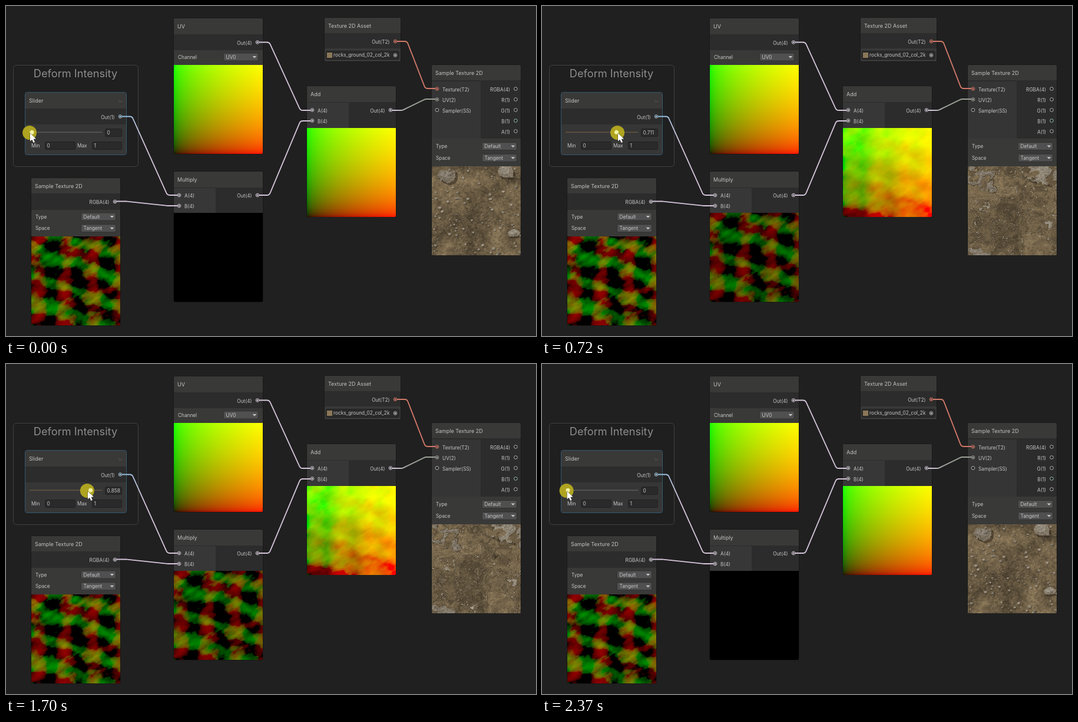
Animation, 900 px wide and 560 px high, one loop 2.42 s. Source, as an HTML page with a canvas:

```html
<!DOCTYPE html>
<html lang="en">
<head>
<meta charset="utf-8">
<title>Deform Intensity</title>
<style>
html, body { margin: 0; width: 100%; height: 100%; overflow: hidden; background: #202020; }
canvas { display: block; }
</style>
</head>
<body>
<canvas id="stage" width="900" height="560"></canvas>
<script>
const ctx = document.getElementById('stage').getContext('2d');
const LOOP = 2420, STEP = LOOP / 47, SIZE = 151;
const LILAC = '#d5c5da', SALMON = '#d3796a', LABEL = '#c6c6c6';

function makeCanvas(w, h) {
  const c = document.createElement('canvas');
  c.width = w;
  c.height = h;
  return c.getContext('2d', { willReadFrequently: true });
}
const clamp = (v, lo, hi) => Math.max(lo, Math.min(hi, v));

// --- noise -------------------------------------------------------------
let seed = 11;
function random() {
  seed = (Math.imul(seed, 1664525) + 1013904223) >>> 0;
  return seed / 4294967296;
}
function hash(x, y) {
  let h = Math.imul(x, 374761393) + Math.imul(y, 668265263);
  h = Math.imul(h ^ (h >>> 13), 1274126177);
  return ((h ^ (h >>> 16)) >>> 0) / 4294967296;
}
function noise(x, y) {
  const ix = Math.floor(x), iy = Math.floor(y);
  let u = x - ix, v = y - iy;
  u *= u * (3 - 2 * u);
  v *= v * (3 - 2 * v);
  const top = hash(ix, iy) * (1 - u) + hash(ix + 1, iy) * u;
  const bottom = hash(ix, iy + 1) * (1 - u) + hash(ix + 1, iy + 1) * u;
  return top * (1 - v) + bottom * v;
}
function fbm(x, y, octaves) {
  let sum = 0, amp = 0.5;
  for (let i = 0; i < octaves; i++, amp /= 2) {
    sum += amp * (noise(x, y) - 0.5);
    x = x * 2.03 + 17;
    y = y * 2.03 + 31;
  }
  return sum;
}

// --- signed deformation field: warped bands broken up by brush streaks ---
function makeField(band, shift) {
  const field = new Float32Array(SIZE * SIZE);
  for (let y = 0; y < SIZE; y++) for (let x = 0; x < SIZE; x++) {
    const wx = x + 30 * fbm(x / 26 + shift, y / 26, 4);
    const wy = y + 30 * fbm(x / 26, y / 26 + shift + 9, 4);
    const streak = fbm((x - 0.6 * y) / 34 + shift, (0.6 * x + y) / 13, 5);
    field[y * SIZE + x] = clamp(0.05 + 0.13 * Math.cos(2 * Math.PI * band(wx, wy)) + 0.5 * streak, -0.2, 0.32);
  }
  return field;
}
const red = makeField(x => (x - 57) / 48, 3);
const green = makeField((x, y) => (y - 22 - 0.38 * x) / 44, 57);

// --- ground texture -----------------------------------------------------
const TEX = 302;
function drawRock(g, x, y, r) {
  const points = Array.from({ length: 8 }, (_, i) => {
    const a = i * Math.PI / 4, d = r * (0.7 + 0.45 * random());
    return [Math.cos(a) * d, Math.sin(a) * d * 0.8];
  });
  const shape = (dx, dy, k, color) => {
    g.fillStyle = color;
    g.beginPath();
    points.forEach(([px, py]) => g.lineTo(x + dx + px * k, y + dy + py * k));
    g.fill();
  };
  const tone = 125 + 40 * random();
  shape(r * 0.15 + 1, r * 0.2 + 1, 1.05, 'rgba(40,33,24,.5)');
  shape(0, 0, 1, `rgba(${tone},${tone * 0.93},${tone * 0.82},.8)`);
  shape(-r * 0.12, -r * 0.15, 0.62, `rgba(${tone + 20},${tone + 13},${tone},.5)`);
}
function makeGround() {
  const g = makeCanvas(TEX, TEX);
  for (const [x, y, r] of [[54, 34, 34], [252, 18, 32], [280, 226, 22]]) drawRock(g, x, y, r);
  for (let i = 0; i < 280; i++) {
    const x = random() * TEX, y = random() * TEX;
    drawRock(g, x, y, 1.6 + 5 * random() ** 4);
  }
  const image = g.getImageData(0, 0, TEX, TEX), d = image.data;
  for (let i = 0; i < TEX * TEX; i++) {
    const x = i % TEX, y = Math.floor(i / TEX);
    const light = 1 + 0.8 * fbm(x / 45, y / 45, 4) + 0.6 * fbm(x / 6, y / 6, 3);
    const a = d[i * 4 + 3] / 255, grain = 1 + 0.55 * fbm(x / 4, y / 4, 2);
    [108, 93, 69].forEach((base, c) => {
      d[i * 4 + c] = base * light * (1 - a) + d[i * 4 + c] * grain * a;
    });
  }
  return d;
}
const ground = makeGround();

// --- previews -----------------------------------------------------------
const gamma = v => 255 * Math.pow(clamp(v, 0, 1), 1 / 2.2);
const panel = makeCanvas(SIZE, SIZE);
const pixels = panel.createImageData(SIZE, SIZE);
function paintPreview(target, left, top, shade) {
  for (let i = 0; i < SIZE * SIZE; i++) {
    const u = (i % SIZE + 0.5) / SIZE, v = 1 - (Math.floor(i / SIZE) + 0.5) / SIZE;
    const [r, g, b] = shade(i, u, v);
    pixels.data.set([r, g, b, 255], i * 4);
  }
  panel.putImageData(pixels, 0, 0);
  target.save();
  target.beginPath();
  target.roundRect(left, top, SIZE, SIZE, [0, 0, 2, 2]);
  target.clip();
  target.drawImage(panel.canvas, left, top);
  target.restore();
}
const scaled = k => i => [gamma(red[i] * k), gamma(green[i] * k), 0];
const offset = k => (i, u, v) => [gamma(u + red[i] * k), gamma(v + green[i] * k), 0];
const wrap = v => Math.floor((v - Math.floor(v)) * TEX) % TEX;
const deformed = k => (i, u, v) => {
  const p = 4 * (wrap(1 - v - green[i] * k) * TEX + wrap(u + red[i] * k));
  return [ground[p], ground[p + 1], ground[p + 2]];
};

// --- interface pieces ---------------------------------------------------
function box(g, x, y, w, h, fill, radius = 0, stroke) {
  g.beginPath();
  g.roundRect(x, y, w, h, radius);
  if (fill) { g.fillStyle = fill; g.fill(); }
  if (stroke) { g.strokeStyle = stroke; g.lineWidth = 1; g.stroke(); }
}
function disc(g, x, y, r, fill) {
  g.beginPath();
  g.arc(x, y, r, 0, 7);
  g.fillStyle = fill;
  g.fill();
}
function text(g, str, x, y, { size = 8.25, color = LABEL, align = 'left' } = {}) {
  g.font = `${size}px Inter, sans-serif`;
  g.textAlign = align;
  g.fillStyle = color;
  g.fillText(str, x, y + size * 0.37);
}
function node(g, name, x, y, w, h, headH = 27) {
  box(g, x - 0.5, y - 0.5, w + 1, h + 1, '#2c2c2c', 3, '#191919');
  box(g, x, y, w, headH, '#393938', [2, 2, 0, 0]);
  text(g, name, x + 6, y + headH / 2 + 0.5, { size: 9, color: '#c2c2c2' });
}
function port(g, x, y, color = '#cfc8d2', linked = true) {
  disc(g, x, y, 2.8, '#202020');
  g.strokeStyle = color;
  g.lineWidth = 1;
  g.stroke();
  if (linked) disc(g, x, y, 1.5, color);
}
function output(g, label, x, y, color, linked) {
  text(g, label, x - 9.5, y + 1, { align: 'right' });
  port(g, x, y, color, linked);
}
function input(g, label, x, y, color, linked) {
  text(g, label, x + 9, y + 1);
  port(g, x, y, color, linked);
}
function dropdown(g, label, value, x, y, fieldX) {
  text(g, label, x, y);
  box(g, fieldX, y - 6.5, 59, 13, '#505050', 2, '#303030');
  text(g, value, fieldX + 4, y);
  g.fillStyle = '#c4c4c4';
  g.beginPath();
  g.moveTo(fieldX + 49, y - 1.5);
  g.lineTo(fieldX + 56, y - 1.5);
  g.lineTo(fieldX + 52.5, y + 2);
  g.fill();
}
function field(g, x, y, w, value) {
  box(g, x + 0.5, y + 0.5, w - 1, 13, '#2a2a2a', 2, '#212121');
  text(g, value, x + 3.5, y + 7);
}
function wire(g, x1, y1, x2, y2, from = LILAC, to = from) {
  const paint = g.createLinearGradient(x1, 0, x2, 0);
  paint.addColorStop(0.1, from);
  paint.addColorStop(0.4, to);
  g.strokeStyle = paint;
  g.lineWidth = 1.8;
  g.beginPath();
  g.moveTo(x1 + 3, y1);
  g.arcTo(x1 + 20, y1, x2 - 20, y2, 6);
  g.arcTo(x2 - 20, y2, x2, y2, 6);
  g.lineTo(x2 - 3, y2);
  g.stroke();
}

function makeBackdrop() {
  const g = makeCanvas(900, 560);
  box(g, 0, 0, 900, 560, '#202020');
  box(g, 12.5, 100.5, 212, 172, '#1f1f1f', 5, '#414141');
  text(g, 'Deform Intensity', 118, 114, { size: 18.2, color: '#8c8c8c', align: 'center' });

  node(g, 'Slider', 33, 147, 171, 105);
  box(g, 33, 201, 171, 51, '#363636', [0, 0, 2, 2]);
  box(g, 32.5, 146.5, 172, 106, null, 3, '#35596f');
  g.strokeStyle = '#606060';
  g.beginPath();
  g.moveTo(191, 160.5);
  g.lineTo(194, 163.5);
  g.lineTo(197, 160.5);
  g.stroke();
  text(g, 'Min', 43, 237);
  field(g, 66, 230, 52, '0');
  text(g, 'Max', 121, 237);
  field(g, 146, 230, 51, '1');

  node(g, 'UV', 285, 21, SIZE, 230);
  box(g, 285, 75, SIZE, 26, '#393938');
  dropdown(g, 'Channel', 'UV0', 292, 86.5, 369.5);

  node(g, 'Texture 2D Asset', 541, 20, 129, 74, 26);
  box(g, 541, 72, 129, 22, '#393938', [0, 0, 2, 2]);
  box(g, 543.5, 76.5, 124, 14, '#292929', 2, '#222222');
  box(g, 545, 79, 9, 9, '#8b7758');
  text(g, 'rocks_ground_02_col_2k', 556, 83);
  port(g, 661, 83.5, '#b8b8b8');

  for (const [name, x, y] of [['Add', 511, 136], ['Multiply', 285, 281]]) {
    node(g, name, x, y, SIZE, 221);
    box(g, x, y + 28, 71, 43, '#373737');
  }
  node(g, 'Sample Texture 2D', 43, 292, SIZE, 250, 26);
  box(g, 43, 346, SIZE, 45, '#393938');
  node(g, 'Sample Texture 2D', 723, 100, SIZE, 322, 26);
  box(g, 723, 128, 83, 97, '#353535');
  box(g, 723, 225, SIZE, 47, '#393938');
  for (const [x, y, fieldX] of [[50, 357.5, 127.5], [730, 238, 808.5]]) {
    dropdown(g, 'Type', 'Default', x, y, fieldX);
    dropdown(g, 'Space', 'Tangent', x, y + 19.7, fieldX);
  }

  wire(g, 194, 187.5, 294, 321, '#91bddd', LILAC);
  wire(g, 185, 331.5, 294, 339);
  wire(g, 427, 61.5, 520, 177);
  wire(g, 427, 321, 520, 195);
  wire(g, 661, 60, 732, 140, SALMON);
  wire(g, 653, 177, 732, 158, LILAC, '#9ca298');

  output(g, 'Out(1)', 194, 187.5, '#a5c5d8');
  output(g, 'RGBA(4)', 185, 332);
  output(g, 'Out(4)', 427, 61.5);
  output(g, 'Out(4)', 427, 321);
  output(g, 'Out(4)', 653, 176.5);
  output(g, 'Out(T2)', 661, 60, SALMON);
  for (const [x, y] of [[294, 321], [520, 176.5]]) {
    input(g, 'A(4)', x, y);
    input(g, 'B(4)', x, y + 18);
  }
  input(g, 'Texture(T2)', 732, 140.5, SALMON);
  input(g, 'UV(2)', 732, 158.5, '#a3a69e');
  input(g, 'Sampler(SS)', 732, 176.5, '#bcbcbc', false);
  ['RGBA(4)', 'R(1)', 'G(1)', 'B(1)', 'A(1)'].forEach((label, i) =>
    output(g, label, 865.5, 140.5 + 18 * i, i === 3 ? '#9ac5bd' : '#bcbcbc', false));

  paintPreview(g, 285, 100, offset(0));
  paintPreview(g, 43, 391, scaled(1));
  return g.canvas;
}
const backdrop = makeBackdrop();

// --- motion: ease out to the right, rest, glide back ---------------------
const RETURN = 1545;
const progress = (t, from, to) => clamp((t - from) / (to - from), 0, 1);
const easeOut = (p, power) => Math.sin(p * Math.PI / 2) ** power;
function pointerAt(t) {
  return t < RETURN
    ? 40 + 123 * easeOut(progress(t, 0, 1340), 1.15)
    : 41.5 + 121.5 * (1 - progress(t, RETURN, 2370)) ** 1.12;
}
function valueAt(t) {
  if (t < RETURN) return easeOut(progress(t, 0, 1290), 1.3);
  const p = progress(t, RETURN, 2340);
  return 1 - (p + (1 - Math.cos(Math.PI * p)) / 2) / 2;
}

function drawPointer(x, y) {
  ctx.beginPath();
  for (const [dx, dy] of [[0, 0], [0, 13.5], [3.2, 10.8], [5.5, 16], [8, 15], [5.8, 9.8], [10, 9.5]])
    ctx.lineTo(x + dx, y + dy);
  ctx.closePath();
  ctx.strokeStyle = 'rgba(20,20,10,.65)';
  ctx.lineWidth = 1;
  ctx.stroke();
  ctx.fillStyle = '#ffffff';
  ctx.fill();
}

function render(t) {
  const value = valueAt(t), x = pointerAt(t);
  ctx.drawImage(backdrop, 0, 0);
  paintPreview(ctx, 285, 351, scaled(value));
  paintPreview(ctx, 511, 207, offset(value));
  paintPreview(ctx, 723, 272, deformed(value));

  box(ctx, 40, 213.5, 123, 1.5, value ? '#64543f' : '#5b5b5b');
  field(ctx, 168, 208, 29, String(Number(value.toFixed(3))));
  disc(ctx, x, 215, 12, 'rgba(184,174,30,.92)');
  disc(ctx, 44 + 116 * value, 214.3, 3.5, '#f3f2a2');
  drawPointer(x + 1, 216);
}

const start = performance.now();
let shown = -1;
function tick() {
  const t = (performance.now() - start) % LOOP;
  const step = Math.min(46, Math.floor((t + 7) / STEP));
  if (step !== shown) {
    render(step * STEP);
    shown = step;
  }
  requestAnimationFrame(tick);
}
tick();
</script>
</body>
</html>
```
